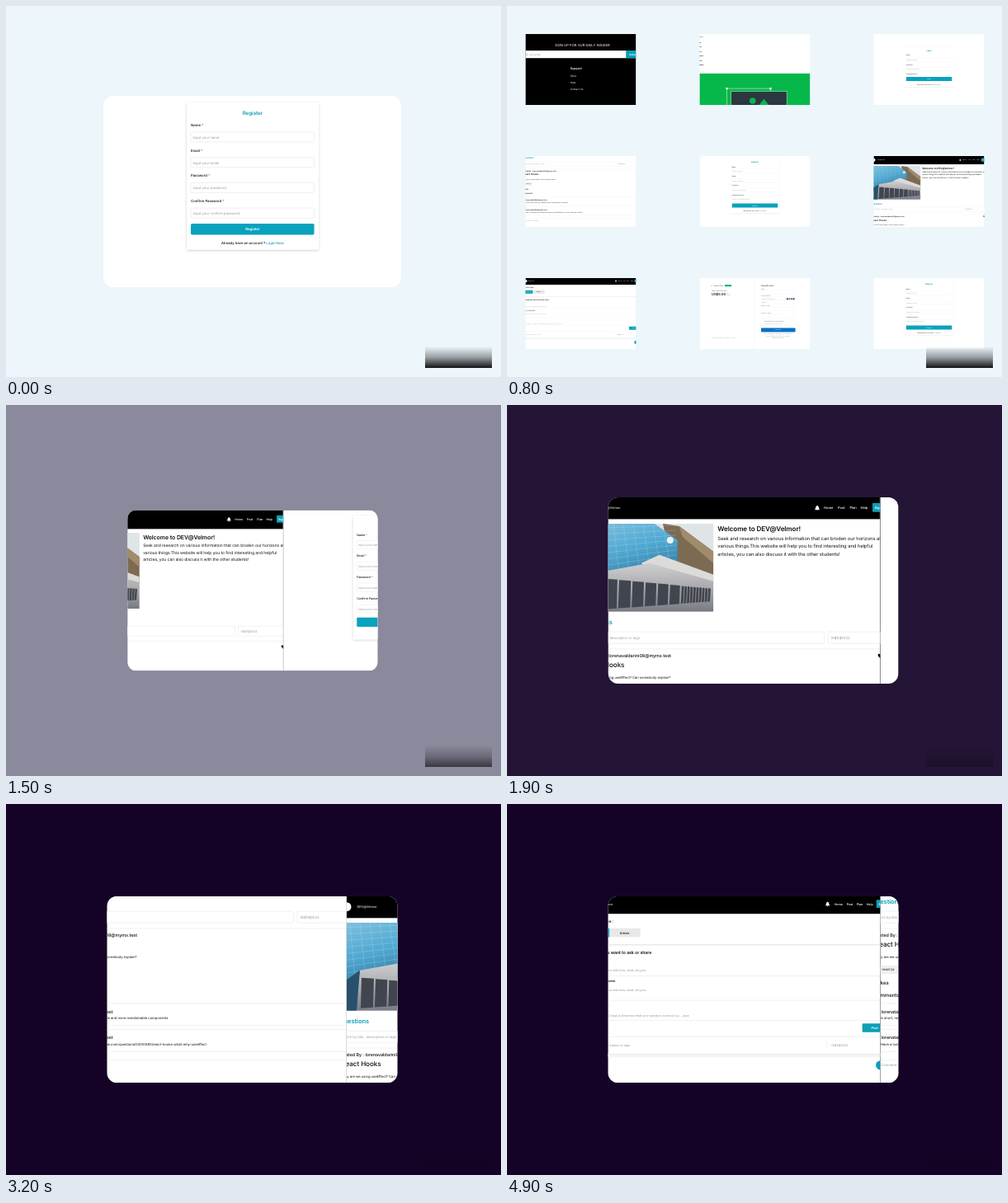
Write an HTML page that moves like this. It is 600x450 px and loops after 5000 ms.

```html
<!DOCTYPE html>
<html lang="en">
<head>
<meta charset="utf-8">
<title>Forum walkthrough</title>
<style>
html, body { margin: 0; width: 100%; height: 100%; overflow: hidden; background: #ecf6fb; }
#stage { display: block; width: 600px; height: 450px; }
text { font-family: Inter, "Open Sans", sans-serif; letter-spacing: -.01em; text-rendering: geometricPrecision; white-space: pre; }
</style>
</head>
<body>
<svg id="stage" viewBox="0 0 600 450">
  <defs>
    <clipPath id="round"><rect width="352" height="226.4" rx="12"/></clipPath>
    <clipPath id="photo"><rect x="-4" y="32" width="153.5" height="107" rx="1.2"/></clipPath>
    <linearGradient id="smear" x2="0" y2="1">
      <stop offset="0" stop-color="#000" stop-opacity="0"/>
      <stop offset=".5" stop-color="#000" stop-opacity=".35"/>
      <stop offset="1" stop-color="#000" stop-opacity=".92"/>
    </linearGradient>
    <linearGradient id="glass" x2=".4" y2="1">
      <stop offset="0" stop-color="#7fc0de"/><stop offset=".5" stop-color="#4fa8d2"/><stop offset="1" stop-color="#2f7195"/>
    </linearGradient>
    <linearGradient id="wall" x2="0" y2="1">
      <stop offset="0" stop-color="#cfcfd0"/><stop offset=".6" stop-color="#a3a3a6"/><stop offset="1" stop-color="#777a82"/>
    </linearGradient>
    <filter id="shadow" x="-10%" y="-10%" width="120%" height="120%">
      <feDropShadow dx="0" dy="1" stdDeviation="1.6" flood-color="#000" flood-opacity=".2"/>
    </filter>
  </defs>
  <rect id="back" width="600" height="450"/>
  <g id="camera"></g>
  <rect id="haze" x="508" y="413" width="81" height="26" fill="url(#smear)"/>
</svg>
<script>
const W = 352, H = 226.4, GAP_X = 554.3, GAP_Y = 388.8;
const TEAL = '#0c9fb6', GRAY = '#9a9aa0', LINE = '#e6e7ea';
const SITE = 'DEV@Velmor';
const ASKER = 'lorenavaldarini08@mymx.test', HELPER = 'lorenatalvik06@mymx.test';

const box = (x, y, w, h, fill, extra = '') =>
  `<rect x="${x}" y="${y}" width="${w}" height="${h}" fill="${fill}" ${extra}/>`;
const frame = (x, y, w, h) => box(x, y, w, h, '#fff', `stroke="${LINE}" stroke-width=".6" rx=".8"`);
const rule = (y, x = 0, w = W) => box(x, y, w, .6, LINE);
const dot = (x, y, r, fill) => `<circle cx="${x}" cy="${y}" r="${r}" fill="${fill}"/>`;
const poly = (points, fill) => `<polygon points="${points}" fill="${fill}"/>`;
const text = (x, y, size, str, fill = '#111', weight = 400, anchor = 'start') =>
  `<text x="${x}" y="${y}" font-size="${size}" fill="${fill}" font-weight="${weight}" text-anchor="${anchor}">${str}</text>`;
const right = (x, y, size, str, fill, weight) => text(x, y, size, str, fill, weight, 'end');
const mid = (x, y, size, str, fill, weight) => text(x, y, size, str, fill, weight, 'middle');
const sheet = body => box(0, 0, W, H, '#fff') + body;
const edge = box(W - .6, 0, .6, H, '#d0d0d3');
const port = (x, y, body, name = '') =>
  `<svg class="${name}" x="${x}" y="${y}" width="${W}" height="${H}">${body}</svg>`;

const bell = (x, y, k) =>
  `<path transform="translate(${x} ${y}) scale(${k})" fill="#fff" d="M-3 2C-1.8 1-2-3 0-3S1.8 1 3 2ZM-1 2.5H1L0 3.4Z"/>`;

function nav(height, base, size, xs, logoEnd, btnX) {
  const names = ['Home', 'Post', 'Plan', 'Help'];
  return box(0, 0, W, height, '#000') +
    dot(0, base - 1.4, size * 1.35, '#fff') +
    right(logoEnd, base, size * .97, SITE, '#fff') +
    bell(xs[0] - 8, base - 1.3, size / 4.1) +
    names.map((n, i) => text(xs[i], base, size, n, '#fff', 500)).join('') +
    box(btnX, base - size * 1.75, 20, size * 2.6, TEAL, 'rx="1"') +
    text(btnX + 2.5, base, size, 'Sign Out', '#fff', 600);
}

const date = (x, y, size) =>
  text(x, y, size, '06<tspan fill="#222">/</tspan>10<tspan fill="#222">/</tspan>2022', GRAY);

function field(y, label, hint) {
  return text(103.4, y, 4.2, label + ' <tspan fill="#c33">*</tspan>', '#111', 500) +
    frame(103.4, y + 7, 145.8, 11.6) + text(105.8, y + 14.7, 4.15, hint, GRAY);
}

function registerPage() {
  const rows = [['Name', 'name'], ['Email', 'email'], ['Password', 'password'], ['Confirm Password', 'confirm password']];
  return sheet(
    box(98.5, 8, 156, 174, '#fff', 'filter="url(#shadow)"') +
    mid(176.4, 22.4, 6.1, 'Register', TEAL, 600) +
    rows.map(([l, h], i) => field(36 + i * 29.95, l, 'Input your ' + h)).join('') +
    box(103.4, 151.2, 145.8, 13.2, '#0aa2bd', 'rx="1.6"') +
    mid(176.4, 159.4, 4.3, 'Register', '#fff', 600) +
    mid(176.4, 175.8, 4.2, `Already have an account ? <tspan fill="${TEAL}">Login Now</tspan>`, '#111', 500));
}

function loginPage() {
  return sheet(
    box(96, 41, 160, 128, '#fff', 'filter="url(#shadow)"') +
    mid(176, 55, 6.1, 'Login', TEAL, 600) +
    field(69, 'Email', 'Input your email') + field(99, 'Password', 'Input your password') +
    text(103.4, 130, 4.2, 'Forgot password ?', '#111', 500) +
    box(103.4, 137, 145.8, 13.2, '#0aa2bd', 'rx="1.6"') +
    mid(176, 145.3, 4.3, 'Login', '#fff', 600) +
    mid(176, 163, 4.2, `Don't have an account ? <tspan fill="${TEAL}">Register Now</tspan>`, '#111', 500));
}

function photo() {
  let s = box(-4, 32, 154, 107, '#dfe4e7') +
    poly('88,32 108,35 149.5,66 149.5,104 100,86', '#7d6a52') +
    poly('108,35 149.5,66 149.5,80 112,48', '#a18b6d') +
    poly('-4,32 78,32 106,52 106,88 -4,114', 'url(#glass)');
  for (let i = 0; i < 9; i++) {
    s += `<path d="M${i * 12 - 8} 32L${i * 13 - 2} 110M-4 ${38 + i * 8}L104 ${34 + i * 6}" stroke="#d4edf6" stroke-opacity=".4" stroke-width=".5"/>`;
  }
  s += poly('62,80 84,70 149.5,94 149.5,106 70,88', '#dcdbda') +
    poly('16,90 72,80 149.5,102 149.5,139 -4,139 12,118', 'url(#wall)') +
    poly('-4,104 16,90 12,139 -4,139', '#28506c') + dot(97, 52, 4, '#eef1f3');
  let x = 17;
  for (let i = 0; i < 16; i++) {
    const w = i < 6 ? 15 - i * .6 : 2.8, top = 99 + (x - 17) * .09, low = 136 - (x - 17) * .07;
    s += poly(`${x + 1},${top} ${x + w + 1},${top + 1} ${x + w},${low - 1} ${x},${low}`, '#41454f');
    x += w + (i < 6 ? 2 : .8);
  }
  return `<g clip-path="url(#photo)">${s}</g>`;
}

// Post list: shared by the home page and its scrolled view
function thread(y, end, split) {
  return right(end, y + 10, 7.5, 'Questions', TEAL, 600) +
    frame(-20, y + 19, split + 20, 14) +
    right(60, y + 27.5, 4.2, 'Search by title , description or tags', GRAY) +
    frame(split + 4.5, y + 19, 80, 14) + date(split + 8, y + 27.5, 4.3) +
    rule(y + 39.5) +
    right(98, y + 50, 5.4, 'Posted By : ' + ASKER, '#111', 500) +
    right(41.5, y + 62.3, 8.1, 'React Hooks', '#111', 500) +
    right(97.5, y + 75.8, 4.2, 'Why are we using useEffect? Can somebody explain?');
}

function homePage() {
  const lines = ['Seek and research on various information that can broden our horizons at',
    'various things.This website will help you to find interesting and helpful',
    'articles, you can also discuss it with the other students!'];
  return sheet(
    nav(26.5, 14.3, 4.1, [283.5, 300.5, 315, 328], 36.8, 342.5) + photo() +
    text(154.5, 41.5, 8.1, `Welcome to ${SITE}!`, '#111', 600) +
    lines.map((l, i) => text(154.5, 52 + i * 9.6, 5.82, l)).join('') +
    thread(144.4, 27, 284) +
    '<path transform="translate(352 192.4)" d="M0 3.2L-2.6 .3C-3.6-2-1-3.4 0-1.5C1-3.4 3.6-2 2.6 .3Z"/>');
}

function threadPage() {
  const reply = (y, end, str) =>
    right(68.5, y, 5.4, HELPER, '#111', 500) + right(end, y + 7.2, 4.2, str) + rule(y + 14.5);
  return sheet(
    thread(-.6, 25.5, 287.5) +
    box(-4, 84, 25.2, 10.5, '#f0f0f1', 'rx="1"') + right(16.8, 90.6, 4.2, 'react-js') +
    right(10, 107, 6.1, '0 Likes', '#111', 500) + right(22.8, 122.4, 6.1, 'Comments', '#111', 500) +
    rule(129.8) + reply(142, 135.5, 'In short, react hooks are readable and more maintainable components') +
    rule(161.5) + reply(173.6, 181.8, 'Have a look https://stackoverflow.com/questions/53051465/react-hooks-what-why-useeffect') +
    rule(198.8) + right(44.5, 206.7, 4.2, 'Comment something...', GRAY));
}

function postPage() {
  const hint = 'Start your question with how, what, why,etc';
  return sheet(
    nav(21.4, 11, 3.7, [296, 311, 323, 335], 28, 347) +
    right(28.5, 32, 4.8, 'Select Post Type :', '#111', 500) +
    box(-12, 39, 35.6, 10.6, TEAL) + right(19, 45.8, 3.8, 'Question', '#fff', 500) +
    box(24, 39, 37, 10.6, '#e8e8ea') + mid(42, 45.8, 3.8, 'Article', '#111', 500) +
    box(0, 58.6, W, 1, '#dcdde0') +
    right(74.5, 70, 5.2, 'What do you want to ask or share', '#111', 600) +
    right(68, 91.5, 3.7, hint, GRAY) + rule(96.6) +
    right(30.5, 104.5, 3.8, 'Describe your problem', '#111', 600) +
    right(68, 115.5, 3.7, hint, GRAY) + rule(126) +
    right(120, 146, 3.7, 'Please add up to 3 tags to describe what your question is about e.g. , Java', GRAY) +
    rule(150.5) + box(330, 154.5, 30, 10.4, TEAL, 'rx="1.2"') + mid(345, 161.4, 4, 'Post', '#fff', 600) +
    rule(170) + right(48.5, 182, 3.7, 'Search by title , description or tags', GRAY) +
    box(287, 175, .6, 11, LINE) + date(292.5, 182, 3.8) +
    box(0, 191, W, 4, '#f3f3f5') + rule(191) + dot(W, 205, 5.6, TEAL));
}

function signupPage() {
  const links = ['FAQs', 'Help', 'Contact Us'];
  return box(0, 0, W, H, '#000') +
    mid(181, 38.5, 11.1, 'SIGN UP FOR OUR DAILY INSIDER', '#fff') +
    box(0, 53, W, 24, '#fff') + text(-8, 68, 7.5, 'Enter your email', GRAY) +
    box(320, 53, 32, 24, TEAL) + text(330, 68, 8, 'Subscribe', '#fff', 600) +
    text(143, 113, 9.6, 'Support', '#fff', 600) +
    links.map((l, i) => text(143, 136 + i * 22, 8, l, '#fff')).join('');
}

function planPage() {
  const items = ['Free', 'Posts', 'Basic', 'Themes', 'Limits', 'Support'];
  return sheet(
    text(-4, 10, 6, 'Plans', TEAL, 600) +
    items.map((l, i) => text(-6, 28 + i * 14.5, 5, l, '#111', 600)).join('') +
    box(0, 126, W, 101, '#06b84a') +
    '<path d="M87 226V174H226V226" fill="none" stroke="#c9f0d6" stroke-width="1.6"/>' +
    box(100, 183, 178, 50, '#2c3840', 'stroke="#7fe0a4" stroke-width="2"') +
    box(84, 171, 6, 6, '#fff') + box(223, 171, 6, 6, '#fff') +
    dot(169, 213, 10, '#06b84a') + poly('185,232 205,207 225,232', '#06b84a'));
}

function payPage() {
  const labels = [[37, 'Email'], [58, 'Card information'], [90, 'Name on card'], [113, 'Country or region']];
  return sheet(
    text(36, 26, 5.4, '← &#160;Student Plan', '#555') + box(80, 21, 22, 6, '#1db874', 'rx="2"') +
    text(38, 43, 5, 'Subscribe to the plan', '#777', 500) +
    text(38, 56, 11, 'US$5.00', '#222', 600) + text(86, 51, 4, 'per', '#777') + text(86, 56, 4, 'month', '#777') +
    text(38, 191, 4.2, 'Powered by checkout', GRAY) + text(84, 191, 4.2, 'Terms  Privacy', GRAY) +
    box(172, 0, .8, H, '#e2e2e5') + text(196, 26, 6, 'Pay with card', '#333', 600) +
    labels.map(([y, l]) => text(196, y, 4, l, '#666') + frame(196, y + 3, 109, 10)).join('') +
    frame(196, 71, 109, 10) + text(199, 68, 4, '1234 1234 1234 1234', GRAY) + text(199, 78, 4, 'MM / YY', GRAY) +
    ['#1f3f8f', '#d2483c', '#2a78c8', '#333'].map((c, i) => box(277 + i * 6.8, 64, 5, 5, c)).join('') +
    frame(196, 132, 109, 20) + text(206, 140, 4, 'Save my info for secure checkout', '#333') +
    text(206, 147, 3.6, 'Pay faster here and on other sites', GRAY) +
    box(196, 159, 109, 13, '#0b70c4', 'rx="2"') + mid(250, 167, 4.4, 'Subscribe', '#fff', 500) +
    ['By confirming your subscription, you allow this', 'site to charge your card for this payment', 'and future payments.']
      .map((l, i) => mid(250, 180 + i * 6.5, 4, l, '#888')).join(''));
}

const tour = [registerPage(), homePage(), threadPage(), postPage()];
const around = [
  [-1, -1, signupPage()], [0, -1, planPage()], [1, -1, loginPage()],
  [-1, 0, tour[2]], [1, 0, tour[1]],
  [-1, 1, tour[3]], [0, 1, payPage()], [1, 1, tour[0]]
];

const [camera, back, haze] = ['camera', 'back', 'haze'].map(id => document.getElementById(id));
camera.innerHTML =
  around.map(([c, r, page]) => port(c * GAP_X - W / 2, r * GAP_Y - H / 2, page)).join('') +
  `<g transform="translate(${-W / 2} ${-H / 2})"><g clip-path="url(#round)">` +
  tour.map((page, i) => port(0, 0, page + (i ? edge : ''), 'page')).join('') + '</g></g>';
const pages = [...camera.querySelectorAll('.page')];

const LOOP = 5000, STEP = 100;
const SLIDES = [1160, 2660, 4160], SLIDE_MS = 1225;
const LIGHT = [236, 246, 251], DARK = [21, 3, 39];
const span = (t, from, ms) => Math.min(1, Math.max(0, (t - from) / ms));
const easeOut = u => 1 - (1 - u) ** 3;
const mix = (a, b, p) => a + (b - a) * p;

function draw(t) {
  const away = easeOut(span(t, 0, 800) ** 1.5), near = easeOut(span(t, 1172, 836));
  const zoom = mix(mix(1.0256, .3807, away), 1, near);
  const cx = mix(mix(298.5, 300.4, away), 298.5, near);
  camera.setAttribute('transform', `translate(${cx} 225) scale(${zoom})`);

  const night = span(t, 1125, 833);
  back.setAttribute('fill', `rgb(${LIGHT.map((c, i) => Math.round(mix(c, DARK[i], night)))})`);
  haze.setAttribute('opacity', mix(1, .2, night));

  // Each page pushes the one before it out to the right
  const moves = SLIDES.map(s => easeOut(span(t, s, SLIDE_MS)));
  pages.forEach((page, i) => {
    const enter = i ? moves[i - 1] : 1, leave = i < moves.length ? moves[i] : 0;
    page.setAttribute('x', W * (enter - 1 + leave));
    page.setAttribute('visibility', enter > 0 && leave < 1 ? 'visible' : 'hidden');
  });
}

const start = performance.now();
function tick() {
  const t = (performance.now() - start) % LOOP;
  draw(Math.floor(t / STEP) * STEP);
  requestAnimationFrame(tick);
}
tick();
</script>
</body>
</html>
```
